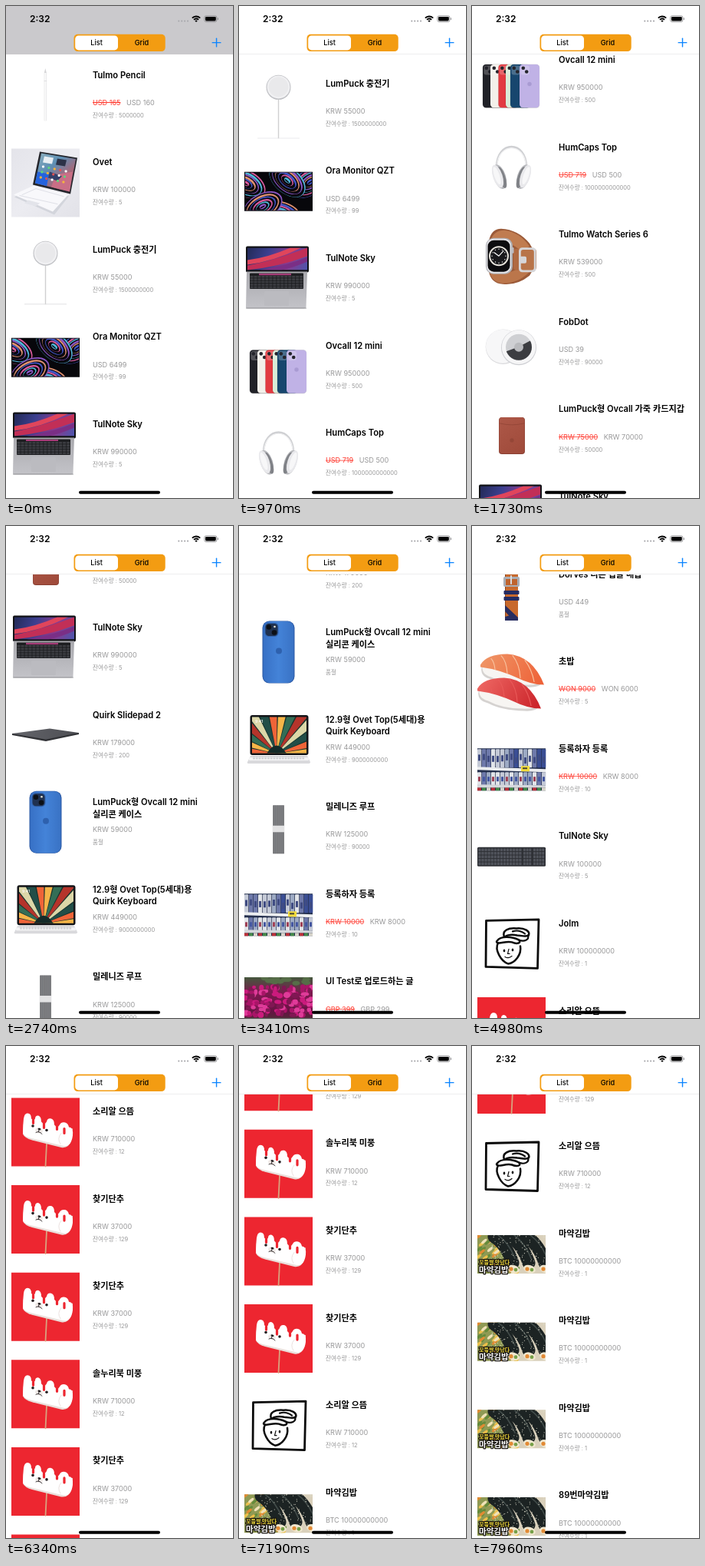
An HTML page with a canvas that plays this animation: 296x640 px, repeating every 8000 ms.

```html
<!DOCTYPE html>
<html lang="ko">
<head>
<meta charset="utf-8">
<title>Product list</title>
<style>
html, body { margin: 0; width: 100%; height: 100%; overflow: hidden; background: #fff; }
canvas { display: block; width: 296px; height: 640px; }
</style>
</head>
<body>
<canvas id="stage"></canvas>
<script>
const W = 296, H = 640, LOOP = 8000, ROW = 113.6, BAR = 63;
const FONT = "Inter, 'Noto Sans CJK KR', 'Noto Sans CJK', sans-serif";
const canvas = document.getElementById('stage');
const g = canvas.getContext('2d');
const dpr = window.devicePixelRatio || 1;
canvas.width = W * dpr;
canvas.height = H * dpr;

// Shape helpers
function fill(color, d) { g.fillStyle = color; g.fill(new Path2D(d)); }
function stroke(color, width, d) {
  g.strokeStyle = color; g.lineWidth = width; g.lineCap = g.lineJoin = 'round';
  g.stroke(new Path2D(d));
}
function rect(color, x, y, w, h, r = 0) {
  g.fillStyle = color; g.beginPath(); g.roundRect(x, y, w, h, r); g.fill();
}
function oval(color, x, y, rx, ry = rx, turn = 0) {
  g.fillStyle = color; g.beginPath(); g.ellipse(x, y, rx, ry, turn, 0, Math.PI * 2); g.fill();
}
function text(str, x, y, size, color, weight = 400, align = 'left') {
  g.font = `${weight} ${size}px ${FONT}`;
  g.fillStyle = color; g.textAlign = align;
  g.fillText(str, x, y);
  return g.measureText(str).width;
}
function blend(x0, y0, x1, y1, ...colors) {
  const grad = g.createLinearGradient(x0, y0, x1, y1);
  colors.forEach((c, i) => grad.addColorStop(i / (colors.length - 1), c));
  return grad;
}
function clipped(d, paint) { g.save(); g.clip(new Path2D(d)); paint(); g.restore(); }
function random(seed) {
  return () => (seed = (seed * 16807) % 2147483647) / 2147483647;
}
function keys(color, x, y, w, h, cols, rows) {
  const dx = w / cols, dy = h / rows;
  for (let r = 0; r < rows; r++)
    for (let c = 0; c < cols; c++) rect(color, x + c * dx, y + r * dy, dx - .8, dy - .8, .5);
}

// Pictures, each in an 89 by 89 box
const pics = {
  stylus() {
    rect(blend(42, 0, 46.5, 0, '#dededf', '#fff', '#d8d8da'), 42.6, 14, 3.4, 64, 1.7);
    fill('#d4d4d6', 'M42.8 15 L44.3 9 L45.8 15Z');
    rect('#d0d0d3', 42.6, 25, 3.4, .6);
  },
  tablet() {
    rect(blend(0, 0, 89, 89, '#e4e4ea', '#ececf1', '#e2e2e8'), 0, 0, 89, 89);
    fill('#d3d5dc', 'M4 63 L29 49 L75 62 L56 86Z');
    fill('#f8f8fb', 'M3 60 L29 48 L74 60 L54 82Z');
    stroke('#dfe0e7', 1, 'M14 60 L32 52 L68 62 M11 61 L60 72');
    fill('#e3e4ea', 'M22 67 L37 71 L32 75 L17 71Z');
    fill('#24252b', 'M37 4 L86 12 L77 59 L28 47Z');
    clipped('M39 6 L84 13.5 L76 56 L31 45Z', () => {
      rect(blend(38, 8, 76, 56, '#86aabd', '#5d8fb4', '#a5697b', '#5b3b55'), 28, 4, 60, 56);
      fill('#2563dd', 'M34 30 L49 33 L46 49 L29 45Z');
      fill('#c96f86', 'M58 34 L80 30 L76 58 L52 50Z');
      fill('#34406a', 'M50 30 L66 36 L60 42 L48 38Z');
      fill('#e8eef3', 'M43 10 L55 12 L53 20 L41 18Z');
      fill('#2c3247', 'M60 13 L72 15 L70 23 L58 21Z');
      for (let i = 0; i < 15; i++)
        rect(['#fff', '#61d67b', '#f4b53d', '#e55353'][i % 4], 40 + i % 5 * 7.4 - (i / 5 | 0) * 1.6, 22 + (i / 5 | 0) * 7 + i % 5 * 1.5, 3, 3, 1);
    });
  },
  charger() {
    rect('#cfcfd1', 43.8, 38, 1.4, 51);
    oval('#bdbec2', 44.5, 22.6, 16);
    oval('#f0f0f2', 44.5, 22.2, 15);
    oval('#e9e9eb', 44.5, 22, 12.8);
    rect('#d8d8da', 17, 88.4, 55, .6);
  },
  monitor() {
    rect('#07070b', 0, 19, 89, 51);
    const tints = ['#4fb6d8', '#d95a9c', '#4256c8', '#e0906f', '#8a55c4'];
    clipped('M1 20H88V69H1Z', () => {
      [[2, 34, .5], [86, 32, -.6], [46, 74, .2], [24, 64, -.5], [56, 30, .7]].forEach(([x, y, turn], n) => {
        for (let k = 6; k > 0; k--) {
          const rx = k * 4.6, ry = k * 2.8;
          oval(tints[(k + n) % 5], x, y, rx, ry, turn);
          oval('#0a0910', x - .5, y + .7, rx - 1, ry - 1 - k % 2, turn);
        }
      });
    });
  },
  laptop() {
    rect('#111216', 2, 2, 82, 34, 2);
    clipped('M4 4H82V33H4Z', () => {
      rect(blend(4, 4, 82, 33, '#232a57', '#3b3f8f', '#8a3a8e', '#4c55ad'), 4, 4, 78, 29);
      fill('#c22f57', 'M4 27 Q34 22 82 4 L82 15 Q44 29 4 33Z');
      fill('#e0455b', 'M4 20 Q30 17 60 4 L74 4 Q38 22 4 26Z');
      fill('#7a2f86', 'M20 33 Q56 27 82 16 V22 Q64 30 48 33Z');
    });
    fill(blend(0, 36, 0, 82, '#a9a9ae', '#c3c3c8'), 'M3 35 H82 L80.5 81 Q80 83 78 83 H4 Q2 83 2 81Z');
    rect('#1d1e21', 7, 37, 70, 20.5, 1);
    rect('#a53c78', 19, 37.5, 42, 2.2);
    keys('#3b3c41', 7.5, 40.5, 69.5, 17, 14, 5);
    rect('#bbbbc0', 26, 60.5, 32, 19, 1.5);
    rect('#8f9094', 2, 82, 79, 1, .5);
  },
  phones() {
    const tones = ['#202127', '#f3f0ea', '#e23a41', '#d9ecd8', '#17466e', '#c0b2e6'];
    [7, 17, 27.5, 37, 43, 55].forEach((x, i) => {
      rect('#0003', x - .3, 23.2, 26.4, 57, 4.5);
      rect(tones[i], x, 23.4, 26, 56.4, 4.2);
      rect('#ffffff38', x + 1.5, 25, 11.5, 12, 3);
      oval('#24242b', x + 4.8, 28.3, 2.3);
      oval('#24242b', x + 9.2, 33, 2.3);
    });
    oval('#a99bd3', 68, 49, 2.7);
  },
  headset() {
    stroke('#cfd0d3', 2.6, 'M25 44 C25 8 64 8 64 44');
    stroke('#f3f3f4', 1.2, 'M25.6 42 C27 11 62 11 63.4 42');
    [-1, 1].forEach(side => {
      const at = dx => 44.5 + side * dx, turn = side * .32;
      oval('#b9babe', at(15.5), 56, 8, 16.5, turn);
      oval('#808287', at(12.5), 57, 4.6, 14.5, turn);
      oval('#e9e9ec', at(18), 55.4, 6.2, 15.5, turn);
      oval('#f7f7f8', at(19), 54.5, 3.4, 12, turn);
    });
  },
  watch() {
    fill('#9b5a38', 'M15 26 Q18 10 31 10 Q53 11 68 29 Q82 50 68 71 Q52 84 33 82 Q18 81 15 66Z');
    fill('#c07c50', 'M17 25 Q22 12 35 12 Q55 14 68 33 L58 40 Q43 25 17 25Z');
    fill('#bb764b', 'M16 67 H40 Q53 64 59 56 L69 65 Q54 81 33 81 Q20 80 16 67Z');
    rect('#b06a42', 47, 36, 30, 28, 4);
    rect('#d6d6d9', 54, 34.5, 22.5, 32, 4.5);
    rect('#b87449', 56.8, 37.3, 17, 26.5, 3);
    rect('#d6d6d9', 54, 46, 10, 9, 2);
    rect('#afb0b5', 11, 22, 35, 47, 10);
    rect('#e4e4e8', 12, 23, 32, 45, 9);
    rect('#0c0c0f', 13.5, 25, 29, 41, 8);
    rect('#bdbdc3', 44.5, 34, 3, 8, 1.5);
    oval('#e6e3dc', 28, 45.5, 13);
    oval('#19191c', 28, 45.5, 11);
    for (let i = 0; i < 12; i++) {
      const a = i * Math.PI / 6;
      oval('#eee', 28 + 9 * Math.cos(a), 45.5 + 9 * Math.sin(a), .7);
    }
    stroke('#fff', 1.2, 'M28 45.5 L22 41 M28 45.5 L34 39');
  },
  tag() {
    oval('#dadadd', 33.5, 50, 22.8);
    oval('#f7f7f8', 33, 49.4, 22);
    oval('#cdced2', 54, 51, 23);
    oval('#f6f6f7', 54, 50.4, 22.2);
    oval('#cfd0d3', 54, 50.4, 17);
    clipped('M35 57 L54 50 L73 40 V75 H35Z', () => oval('#3c3d41', 54, 50.4, 17));
    oval('#b9babd', 54, 50.4, 6);
  },
  wallet() {
    rect('#8a4033', 28, 28, 34, 48, 4);
    rect(blend(28, 28, 62, 75, '#ad5848', '#9f4a3a'), 28.5, 28, 33, 47, 4);
    stroke('#8f4234', .7, 'M29 36 Q45 40 61 36');
    oval('#944637', 45, 58, 2.6);
  },
  trackpad() {
    fill('#313236', 'M1 42 V44 L45 52 L88 43 V41Z');
    fill(blend(0, 36, 88, 50, '#65666c', '#4c4d52'), 'M1 42 L50 35.5 L88 41 L45 49.5Z');
  },
  phoneCase() {
    rect('#2a58a3', 23.5, 3, 42, 81, 9);
    rect(blend(24, 0, 65, 0, '#3770c5', '#4483d8', '#3972c4'), 24.5, 3.5, 40, 80, 8.5);
    rect('#3263ac', 26.5, 5.5, 18, 18, 5);
    rect('#203251', 27.5, 6.5, 16, 16, 4.5);
    oval('#0c1016', 32, 11, 3.3);
    oval('#0c1016', 39, 18, 3.3);
    oval('#e9e7d9', 39.5, 10.5, 1.3);
    oval('#2e61ae', 45, 42, 4);
  },
  stand() {
    rect('#131418', 7.5, 12, 76, 52, 3);
    clipped('M10 14.5H81V61.5H10Z', () => {
      rect('#17332e', 10, 14, 71, 48);
      const tints = ['#ef6438', '#f6b548', '#346e56', '#b5342b', '#dcd7a8', '#224e48'];
      for (let i = 0; i < 15; i++) {
        const a = Math.PI + i * .23, b = a + .2;
        fill(tints[i % 6], `M42 62 L${42 + 70 * Math.cos(a)} ${62 + 70 * Math.sin(a)} L${42 + 70 * Math.cos(b)} ${62 + 70 * Math.sin(b)}Z`);
      }
      fill('#152b29', 'M29 62 Q42 41 55 62Z');
    });
    text('9:41', 14, 22, 5, '#fff', 600);
    fill('#d9d9dc', 'M8 65 H82 L86 73 Q86 75 83 75 H6 Q3 75 4 73Z');
    rect('#f5f5f6', 6, 67, 78, 4, 1);
    keys('#c6c7ca', 11, 66, 68, 4, 18, 2);
  },
  mesh() {
    rect('#898a8d', 37, 15.5, 15, 63, .5);
    for (let i = 0; i < 8; i++) rect('#696a6d', 38 + i * 1.8, 15.5, .8, 63);
    rect('#e2e2e3', 36.7, 42, 15.6, 8.5, .5);
  },
  shelf() {
    const rnd = random(17);
    rect('#25304e', 0, 17, 89, 55);
    const tones = ['#c5cad7', '#3a4e94', '#9daac4', '#6e79aa', '#e1e4e9'];
    for (let i = 0; i < 15; i++) {
      const x = i * 6;
      rect(tones[rnd() * 5 | 0], x, 18, 5.3, 24, 1);
      rect('#3f4b82', x + 1, 24 + rnd() * 5, 3, 8);
      rect(tones[rnd() * 5 | 0], x, 48, 5.3, 17, 1);
      rect(i % 3 ? '#4356a0' : '#9f4055', x + 1, 54, 3, 6);
      rect(['#bc3139', '#448a49', '#d8d4ca'][i % 3], x, 68, 5, 4);
    }
    fill('#eceef0', 'M0 41 L89 44 V48 L0 45Z');
    fill('#d4d7dc', 'M0 64 L89 65 V68 H0Z');
    rect('#f2dc3e', 57, 40, 11, 7);
    rect('#4a4630', 59, 42, 6, 2);
  },
  flowers() {
    const rnd = random(41);
    rect(blend(0, 12, 0, 79, '#44583d', '#7d174e', '#661443', '#37482a'), 0, 12, 89, 67);
    clipped('M0 12H89V79H0Z', () => {
      for (let i = 0; i < 130; i++) {
        const x = rnd() * 89, y = 24 + rnd() * 38;
        oval(['#cb1b7d', '#a91468', '#df3b99', '#801753'][i % 4], x, y, 2 + rnd() * 3, 2 + rnd() * 2);
      }
      for (let i = 0; i < 26; i++)
        oval(['#4c6335', '#2f3d28', '#e3a632', '#b2472e'][i % 4], rnd() * 89, 66 + rnd() * 13, 2 + rnd() * 2.4);
      for (let i = 0; i < 14; i++) oval('#566d48', 20 + rnd() * 69, 13 + rnd() * 7, 5, 3);
    });
  },
  tagLoop() {
    fill('#e85e48', 'M37 12 H52 V47 L48 54 H41 L37 47Z');
    rect('#f5745c', 38, 12.5, 13, 34, 1);
    rect('#d55140', 43.5, 22, 1.5, 20);
    oval('#c8c9cd', 44.5, 50, 4);
    oval('#e7604a', 44.5, 65, 12.7);
    oval('#f7866d', 44.5, 64.5, 11.5);
    oval('#e0e1e4', 44.5, 65, 9);
    clipped('M34 69 L56 60 V77 H34Z', () => oval('#424348', 44.5, 65, 8.5));
    oval('#aaacb0', 44.5, 65, 3.2);
  },
  strap() {
    rect('#c8692d', 36, 5, 17, 73, 1);
    rect('#8e471f', 36, 5, 1, 73);
    rect('#aaaeb5', 34, 21, 21, 13, 2);
    rect('#bf642e', 37, 24, 15, 8);
    rect('#d9dbde', 43, 19, 2, 12, 1);
    rect('#252c62', 34.5, 39, 20, 5, 1);
    rect('#252c62', 34.5, 47, 20, 5, 1);
    fill('#282d60', 'M36 58 L53 74 V78 H47 L36 66Z');
    fill('#282d60', 'M36 73 L47 70 L53 78 H36Z');
    for (let i = 0; i < 3; i++) oval('#6b371b', 44.5, 9 + i * 4, .8);
  },
  sushi() {
    const piece = (top, stripe) => {
      fill('#d5d2d0', 'M6 24 Q2 37 18 41 Q35 50 65 51 Q80 52 84 46 L62 28Z');
      fill('#f7f5f2', 'M7 22 Q4 34 18 38 Q36 48 63 48 Q76 49 81 44 L62 27Z');
      fill(top, 'M4 22 Q12 8 39 8 Q72 10 87 48 Q70 48 52 39 Q28 28 4 25Z');
      stroke(stripe, 1.1, 'M18 14 Q22 18 23 28 M31 10 Q38 17 39 33 M46 10 Q55 21 56 39 M62 16 Q71 28 74 44');
    };
    piece(blend(10, 8, 80, 48, '#ef9566', '#ee6339'), '#f8c29f');
    g.save();
    g.translate(-4, 31);
    piece(blend(10, 8, 80, 48, '#ed6662', '#cc252b'), '#e95a59');
    g.restore();
  },
  keyboard() {
    rect('#2f3136', 0, 32, 89, 25, 1.5);
    keys('#50535b', 1.3, 33.6, 57, 22.5, 14, 5);
    keys('#50535b', 60, 33.6, 11, 22.5, 3, 5);
    keys('#50535b', 73, 33.6, 15, 22.5, 4, 5);
  },
  doodle() {
    const ink = '#0b0b0b';
    stroke(ink, 2.8, 'M11.5 14 L80 12.5 L78.5 76 L11 74Z');
    stroke(ink, 2.5, 'M27 43 C22 52 31 67 40 70 C49 69 58 58 56 47');
    stroke(ink, 2.5, 'M26 40 C30 34 44 34 54 39 C58 43 52 45 45 42 C38 40 31 44 27 43 C24 42 25 41 26 40');
    stroke(ink, 2.5, 'M35 35 C32 27 40 23 51 24 C62 23 69 28 67 33 C62 36 58 33 52 33 C46 32 40 32 36 35');
    stroke(ink, 2.2, 'M54 39 C61 42 68 39 66 33 M46 28 C52 26 58 28 62 31');
    oval(ink, 35, 53, 1.3, 1.9);
    oval(ink, 46, 52, 1.3, 1.9);
    stroke(ink, 1.2, 'M41 51 L39.5 57 L42 57 M36 61 Q41 64 45 60');
  },
  mallow() {
    rect('#ed2630', 0, 0, 89, 89);
    stroke('#d9a27e', 1.8, 'M46 60 L44.5 89');
    fill('#eadfdb', 'M16 34 L15 47 Q17 52 27 55 L65 64.5 Q75 66 78 55 L80 40Z');
    fill('#fff', 'M15 46 Q15 35 16 27 Q17 20 21 20 Q26 20 26 27 Q29 31 31 27 Q31 23 35 23 Q39 24 39 31 Q43 36 46 31 Q47 26 52 27 Q56 28 56 35 Q60 40 63 35 Q65 31 70 32 Q74 33 75 38 Q81 38 80 49 Q78 64 68 62.5 L28 53 Q17 51 15 46Z');
    stroke('#ed2630', 3.2, 'M28.5 29 V33 M42.5 32 V39 M59.5 36 V41 M69 40 V46');
    stroke('#e6dad7', .8, 'M65 46 Q59 53 64 60');
    oval('#252022', 28, 36.5, 1.8);
    oval('#252022', 46, 42, 1.8);
    oval('#f1ebe8', 36, 42.5, 5, 3.6, .25);
    oval('#252022', 36.5, 40.6, 2, 1.3, .25);
    stroke('#252022', .9, 'M36 41 L35.5 44 M32 45 Q36 42.5 40 47');
  },
  gimbap() {
    const rnd = random(73);
    rect('#d9d0bb', 0, 20, 89, 50);
    clipped('M0 20H89V70H0Z', () => {
      fill('#8f9a54', 'M0 20 H26 L50 70 H0Z');
      for (let i = 0; i < 44; i++) {
        const y = 20 + rnd() * 50;
        oval(['#e08b33', '#f0e2b8', '#648b3b', '#ecc04b'][i % 4], rnd() * (20 + y / 2), y, 4.5, 1.8, -.7);
      }
      for (let i = 0; i < 3; i++) {
        const x = 22 + i * 21;
        stroke('#1c2323', 17, `M${x} 22 Q${x + 16} 32 ${x + 24} 56`);
        stroke('#414b49', 1.6, `M${x + 5} 20 Q${x + 19} 30 ${x + 27} 50`);
        oval('#f0e7cf', x + 25, 64, 8, 5, .3);
        oval('#e28a35', x + 22, 64, 2.6);
        oval('#76a048', x + 28, 65, 2.4);
      }
      for (let i = 0; i < 110; i++) oval('#dedccb', 18 + rnd() * 71, 20 + rnd() * 40, .55);
    });
    g.strokeStyle = '#181511'; g.lineWidth = 2.4; g.lineJoin = 'round';
    [['꼬들쌀 맛났다', 58, 7, '#f6df3d'], ['마약김밥', 68.5, 10.5, '#fff']].forEach(([s, y, size, color]) => {
      g.font = `800 ${size}px ${FONT}`; g.textAlign = 'left';
      g.strokeText(s, 2, y);
      text(s, 2, y, size, color, 800);
    });
  }
};

// picture, title, price, stock (0 = sold out), former price
const items = [
  ['stylus', 'Tulmo Pencil', 'USD 160', 5000000, 'USD 165'],
  ['tablet', 'Ovet', 'KRW 100000', 5],
  ['charger', 'LumPuck 충전기', 'KRW 55000', 1500000000],
  ['monitor', 'Ora Monitor QZT', 'USD 6499', 99],
  ['laptop', 'TulNote Sky', 'KRW 990000', 5],
  ['phones', 'Ovcall 12 mini', 'KRW 950000', 500],
  ['headset', 'HumCaps Top', 'USD 500', 1000000000000, 'USD 719'],
  ['watch', 'Tulmo Watch Series 6', 'KRW 539000', 500],
  ['tag', 'FobDot', 'USD 39', 90000],
  ['wallet', 'LumPuck형 Ovcall 가죽 카드지갑', 'KRW 70000', 50000, 'KRW 75000'],
  ['laptop', 'TulNote Sky', 'KRW 990000', 5],
  ['trackpad', 'Quirk Slidepad 2', 'KRW 179000', 200],
  ['phoneCase', 'LumPuck형 Ovcall 12 mini\n실리콘 케이스', 'KRW 59000', 0],
  ['stand', '12.9형 Ovet Top(5세대)용\nQuirk Keyboard', 'KRW 449000', 9000000000],
  ['mesh', '밀레니즈 루프', 'KRW 125000', 90000],
  ['shelf', '등록하자 등록', 'KRW 8000', 10, 'KRW 10000'],
  ['flowers', 'UI Test로 업로드하는 글', 'GBP 299', 10, 'GBP 399'],
  ['tagLoop', 'FobDot 루프', 'KRW 39000', 3000],
  ['strap', 'Dorvès 리본 겹줄 매듭', 'USD 449', 0],
  ['sushi', '초밥', 'WON 6000', 5, 'WON 9000'],
  ['shelf', '등록하자 등록', 'KRW 8000', 10, 'KRW 10000'],
  ['keyboard', 'TulNote Sky', 'KRW 100000', 5],
  ['doodle', 'Jolm', 'KRW 100000000', 1],
  ['mallow', '소리알 으뜸', 'KRW 710000', 12],
  ['mallow', '찾기단추', 'KRW 37000', 129],
  ['mallow', '찾기단추', 'KRW 37000', 129],
  ['mallow', '솔누리북 미풍', 'KRW 710000', 12],
  ['mallow', '찾기단추', 'KRW 37000', 129],
  ['mallow', '찾기단추', 'KRW 37000', 129],
  ['doodle', '소리알 으뜸', 'KRW 710000', 12],
  ['gimbap', '마약김밥', 'BTC 10000000000', 1],
  ['gimbap', '마약김밥', 'BTC 10000000000', 1],
  ['gimbap', '마약김밥', 'BTC 10000000000', 1],
  ['gimbap', '89번마약김밥', 'BTC 10000000000', 1]
];

// The screen refreshes in steps: [end of run, steps in it]
const runs = [[500, 1], [1300, 7], [1730, 4], [1850, 1], [2740, 8], [2860, 1], [3850, 9], [3990, 1],
  [4210, 2], [4320, 1], [4980, 6], [5100, 1], [6340, 11], [6440, 1], [7540, 10], [7960, 4]];
const ticks = [0];
for (const [end, n] of runs) {
  const from = ticks[ticks.length - 1];
  for (let i = 1; i <= n; i++) ticks.push(from + (end - from) * i / n);
}

// Scroll path: [time, offset], joined by smooth curves
const path = [[400, 0], [1730, 587.5], [2740, 1093.5], [4210, 1586.4], [4980, 2071.8], [6340, 2617.3], [7960, 3253.9]];
function slope(i) {
  if (i === 0) return .3;
  const a = path[i - 1], b = path[Math.min(i + 1, path.length - 1)];
  return (b[1] - a[1]) / (b[0] - a[0]);
}
function scrollAt(t) {
  if (t <= path[0][0]) return 0;
  let i = 0;
  while (i < path.length - 2 && t >= path[i + 1][0]) i++;
  const [t0, y0] = path[i], [t1, y1] = path[i + 1];
  const d = t1 - t0, u = (t - t0) / d, v = 1 - u;
  return y0 * (1 + 2 * u) * v * v + y1 * u * u * (3 - 2 * u)
    + d * u * v * (slope(i) * v - slope(i + 1) * u);
}

function drawRow([pic, title, price, stock, former], y) {
  g.save();
  g.translate(7, y + 9);
  pics[pic]();
  g.restore();
  title.split('\n').forEach((line, i) => text(line, 113, y + 30.5 + i * 15.6, 11.15, '#000', 600));
  let x = 113;
  if (former) {
    const w = text(former, x, y + 65.7, 9.1, '#ff3b30');
    rect('#ff3b30', x, y + 62.1, w, .8);
    x += w + 7.5;
  }
  text(price, x, y + 65.7, 9.1, '#989899');
  text(stock ? '잔여수량 : ' + stock : '품절', 113, y + 81.6, 7.5, '#989899');
}

function drawBar(still) {
  rect(still ? '#cac9cc' : '#fff', 0, 0, W, BAR);
  if (!still) rect('#dededf', 0, BAR - .5, W, .6);
  text('2:32', 31, 21, 12, '#000', 600);
  for (let i = 0; i < 4; i++) oval('#a9a9ad', 225.3 + i * 3.9, 19.6, 1.1);
  g.lineCap = 'butt';
  g.strokeStyle = '#000'; g.lineWidth = 1.8;
  for (const r of [4.1, 7.1]) {
    g.beginPath(); g.arc(248, 20.6, r, -Math.PI * .76, -Math.PI * .24); g.stroke();
  }
  fill('#000', 'M248 21 L246.3 19.2 Q248 17.8 249.7 19.2Z');
  g.strokeStyle = '#88888b'; g.lineWidth = .8;
  g.beginPath(); g.roundRect(258.7, 12.7, 16.2, 8, 2.4); g.stroke();
  rect('#000', 259.9, 13.9, 13.8, 5.6, 1.4);
  rect('#88888b', 275.8, 15.3, 1, 2.8, .5);

  rect('#f39c12', 88.5, 36.7, 119.2, 22.4, 5);
  rect('#fff', 90.2, 38.4, 55.8, 19, 4.5);
  text('List', 118, 51, 9.2, '#000', 500, 'center');
  text('Grid', 177, 51, 9.2, '#000', 500, 'center');
  rect('#0a84ff', 268.5, 46.9, 12, 1.4, .6);
  rect('#0a84ff', 273.8, 41.6, 1.4, 12, .6);
}

function draw() {
  const now = performance.now() % LOOP;
  const t = ticks.filter(k => k <= now).pop();
  const top = BAR - scrollAt(t);
  g.setTransform(dpr, 0, 0, dpr, 0, 0);
  rect('#fff', 0, 0, W, H);
  items.forEach((item, i) => {
    const y = top + i * ROW;
    if (y > -ROW && y < H) drawRow(item, y);
  });
  drawBar(t < 500);
  rect('#000', 95, 630.8, 106, 4, 2);
  requestAnimationFrame(draw);
}
draw();
</script>
</body>
</html>
```
